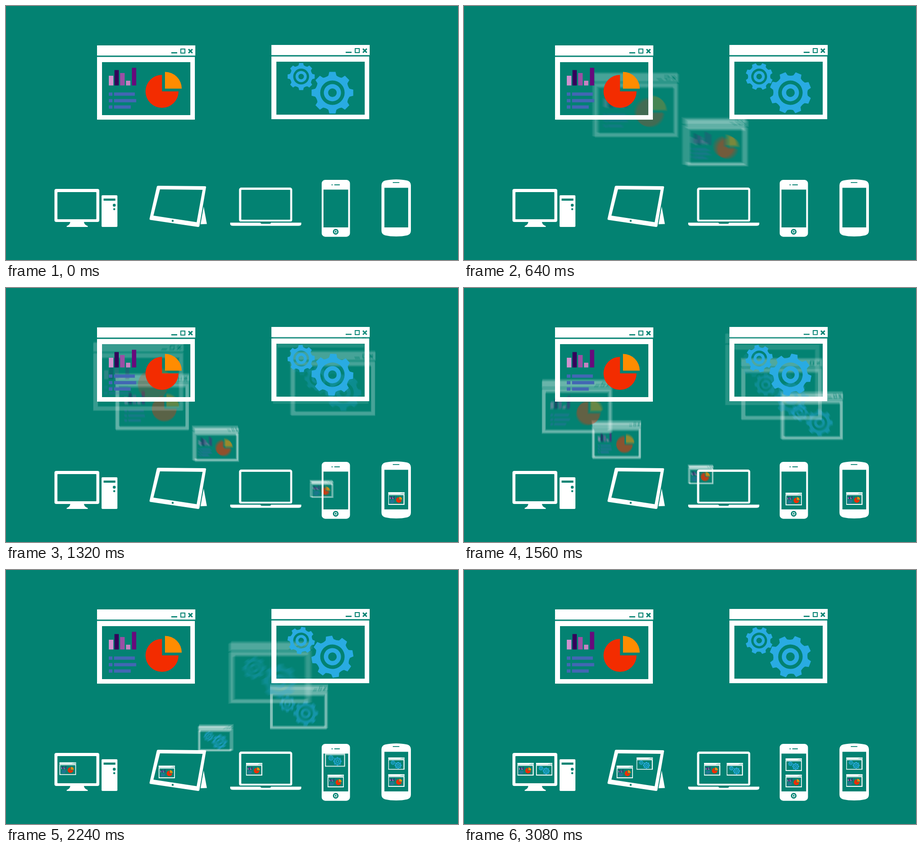
These frames come from a looping animation (998 by 561 pixels, 3.12 s). An HTML page with a canvas:

```html
<!DOCTYPE html>
<html lang="en">
<head>
<meta charset="utf-8">
<title>Windows flying to devices</title>
<style>
  html, body { margin: 0; width: 100%; height: 100%; overflow: hidden; background: #038272; }
  canvas { display: block; }
</style>
</head>
<body>
<canvas id="stage" width="998" height="561"></canvas>
<script>
const LOOP = 3120, STEP = 40, FLIGHT = 1220, SHUTTER = 20, SAMPLES = 8;
const TEAL = '#038272', WHITE = '#fff', BLUE = '#29abe2', INDIGO = '#4267b4';
const WIN_W = 217, WIN_H = 164, SMALL = 36 / WIN_W;
const SPIN = 36; // degrees per second

function makeCanvas(w, h) {
  const c = document.createElement('canvas');
  c.width = w;
  c.height = h;
  const g = c.getContext('2d');
  g.imageSmoothingQuality = 'high';
  return g;
}

const ctx = document.getElementById('stage').getContext('2d');
ctx.imageSmoothingQuality = 'high';
const blur = makeCanvas(998, 561);

function box(g, color, x, y, w, h) {
  g.fillStyle = color;
  g.fillRect(x, y, w, h);
}

function disc(g, color, x, y, r) {
  g.fillStyle = color;
  g.beginPath();
  g.arc(x, y, r, 0, 7);
  g.fill();
}

function drawFrame(g) {
  box(g, WHITE, 0, 0, 217, 22.5);
  g.fillStyle = WHITE;
  g.beginPath();
  g.rect(0, 25.5, 216, 138.5);
  g.rect(11, 37, 195, 117);
  g.fill('evenodd');

  g.globalCompositeOperation = 'destination-out';
  g.fillRect(164, 15, 13, 2.7);
  g.lineWidth = 2;
  g.strokeRect(185, 8, 9, 9);
  g.lineWidth = 3;
  g.beginPath();
  g.moveTo(202, 8.4);
  g.lineTo(210.6, 17);
  g.moveTo(210.6, 8.4);
  g.lineTo(202, 17);
  g.stroke();
  g.globalCompositeOperation = 'source-over';
}

function sector(g, color, x, y, r, from, to) {
  g.fillStyle = color;
  g.beginPath();
  g.moveTo(x, y);
  g.arc(x, y, r, from, to);
  g.fill();
}

function drawChart(g) {
  const bars = [
    [26, 10, 67, '#d291d0'], [38.5, 9.5, 54.5, '#34005b'], [51, 10, 61, '#9a4fa5'],
    [64, 9.5, 78, '#c583c2'], [77, 9.5, 49.5, '#670a7c']
  ];
  for (const [x, w, top, color] of bars) box(g, color, x, top, w, 88.5 - top);
  [[104, 46], [118.5, 49], [132.5, 37]].forEach(([y, w]) => {
    box(g, INDIGO, 26, y, 8, 7.2);
    box(g, INDIGO, 37.5, y, w, 7.2);
  });
  sector(g, '#f32c00', 143.5, 101.5, 36.5, 0, Math.PI * 1.5);
  sector(g, '#ff8c00', 150, 95.5, 37, Math.PI * 1.5, Math.PI * 2);
}

function gearPath(teeth, tip, root) {
  const p = new Path2D(), deg = Math.PI / 180, pitch = 360 / teeth;
  const at = (a, r) => [r * Math.cos(a * deg), r * Math.sin(a * deg)];
  for (let i = 0; i < teeth; i++) {
    const a = i * pitch;
    p.lineTo(...at(a - 13, root + 1));
    p.lineTo(...at(a - 8.5, tip));
    p.lineTo(...at(a + 8.5, tip));
    p.lineTo(...at(a + 13, root + 1));
    p.quadraticCurveTo(...at(a + pitch / 2, root - 1.5), ...at(a + pitch - 13, root + 1));
  }
  p.closePath();
  for (const r of [27, 19, 9.5]) {
    p.moveTo(r, 0);
    p.arc(0, 0, r, 0, Math.PI * 2);
  }
  return p;
}
const gear = gearPath(8, 46.5, 38);

function drawGear(g, x, y, scale, angle) {
  g.save();
  g.translate(x, y);
  g.scale(scale, scale);
  g.rotate(angle * Math.PI / 180);
  g.fillStyle = BLUE;
  g.fill(gear, 'evenodd');
  g.restore();
}

function drawGears(g, x, y, angle) {
  drawGear(g, x + 65.7, y + 69.8, 0.65, -angle);
  drawGear(g, x + 134.7, y + 105.5, 1, angle);
}

function sprite(paint) {
  const g = makeCanvas(WIN_W, WIN_H);
  drawFrame(g);
  if (paint) paint(g);
  return g.canvas;
}
const frameArt = sprite();
const chartArt = sprite(drawChart);
const gearArt = sprite(g => drawGears(g, 0, 0, 0));

// Each flight: start time, landing centre
const chart = { art: chartArt, x: 309.5, y: 169, flights: [
  [72, 861.5, 465], [313, 728, 466], [593, 547.5, 440], [870, 355, 446], [1073, 135.5, 440]
] };
const gears = { art: gearArt, x: 694.5, y: 168, flights: [
  [995, 861.5, 427.5], [1189, 728, 430], [1395, 398.5, 427.5], [1633, 597.5, 440], [1865, 177, 440]
] };

const clamp = v => Math.max(0, Math.min(1, v));
const ease = u => (1 - Math.cos(Math.PI * u)) / 2;

function place(g, src, tx, ty, p) {
  const s = 1 + (SMALL - 1) * p;
  const w = WIN_W * s, h = WIN_H * s;
  g.drawImage(src.art, src.x + (tx - src.x) * p - w / 2, src.y + (ty - src.y) * p - h / 2, w, h);
}

function drawFlight(src, [start, tx, ty], t) {
  const u = (t - start) / FLIGHT;
  if (u <= 0) return;
  if (u >= 1) return place(ctx, src, tx, ty, 1);
  // Motion blur: average several moments of the open shutter
  blur.globalCompositeOperation = 'source-over';
  blur.clearRect(0, 0, 998, 561);
  blur.globalCompositeOperation = 'lighter';
  blur.globalAlpha = 1 / SAMPLES;
  for (let i = 0; i < SAMPLES; i++) {
    const shift = ((i + 0.5) / SAMPLES - 0.5) * SHUTTER / FLIGHT;
    place(blur, src, tx, ty, ease(clamp(u + shift)));
  }
  ctx.globalAlpha = u;
  ctx.drawImage(blur.canvas, 0, 0);
  ctx.globalAlpha = 1;
}

function panel(g, [x, y, w, h, r], [ix, iy, iw, ih, ir]) {
  g.fillStyle = WHITE;
  g.beginPath();
  g.roundRect(x, y, w, h, r);
  g.roundRect(ix, iy, iw, ih, ir);
  g.fill('evenodd');
}

function shape(g, d) {
  g.fillStyle = WHITE;
  g.fill(new Path2D(d), 'evenodd');
}

function drawDevices(g) {
  // Desktop
  panel(g, [107, 404, 99, 73, 4], [113.5, 411, 86, 60, 1]);
  shape(g, 'M142 476H172Q172 483 180.5 486V488H134V486Q142 483 142 476Z');
  g.beginPath();
  g.roundRect(211, 418, 35, 70, 2);
  g.fill();
  box(g, TEAL, 215.5, 425.3, 26, 4.7);
  disc(g, TEAL, 239, 440, 3.2);
  disc(g, TEAL, 239, 448.7, 2.3);

  // Tablet
  shape(g, 'M336 397L439.500 398Q442 398 441.700 400.500L427 486Q426.500 488.500 424 488L319 472.500' +
    'Q316.500 472 317 469.500L333 399Q333.500 397 336 397Z' +
    'M340 405L434 406L421 477.500L325.500 463Z');
  shape(g, 'M436.500 443L443.500 481.500L429.500 482Z');
  box(g, TEAL, 366, 472.5, 4, 4);

  // Laptop
  panel(g, [514.5, 401, 117.5, 76, 5], [519.5, 406, 108, 66, 1]);
  box(g, TEAL, 512, 476, 122, 2.5);
  shape(g, 'M495 478.500H562Q562 481 565 481H582Q585 481 585 478.500H652V482Q651 485.500 646 485.500H501Q496 485.500 495 482Z');

  // Phone with round button
  panel(g, [697, 384, 62.5, 125.7, 8], [701, 405.5, 54.5, 83.5, 0]);
  box(g, TEAL, 725, 394, 12, 2);
  disc(g, TEAL, 720, 395, 1.3);
  disc(g, TEAL, 728, 498.6, 6.3);
  g.strokeStyle = WHITE;
  g.lineWidth = 1.5;
  g.beginPath();
  g.roundRect(725.6, 496.2, 4.8, 4.8, 1);
  g.stroke();

  // Phone with curved ends
  shape(g, 'M829 396Q829 388 837 385.500Q848 383 861.500 383Q875 383 886 385.500Q894 388 894 396V496' +
    'Q894 504 886 506.500Q875 509 861.500 509Q848 509 837 506.500Q829 504 829 496Z' +
    'M835.500 401.500V489H888V401.500Z');
  box(g, TEAL, 854, 389, 14.5, 1.8);
}

const devices = makeCanvas(998, 561);
drawDevices(devices);

function draw(t) {
  box(ctx, TEAL, 0, 0, 998, 561);
  for (const src of [chart, gears]) {
    for (const flight of src.flights) drawFlight(src, flight, t);
  }
  ctx.drawImage(chartArt, 201, 87);
  ctx.drawImage(frameArt, 586, 86);
  drawGears(ctx, 586, 86, t / 1000 * SPIN);
  // Cut-outs of the devices stay see-through, so landed windows show inside
  ctx.drawImage(devices.canvas, 0, 0);
}

function tick() {
  const t = performance.now() % LOOP;
  draw(Math.floor(t / STEP) * STEP);
  requestAnimationFrame(tick);
}
tick();
</script>
</body>
</html>
```
